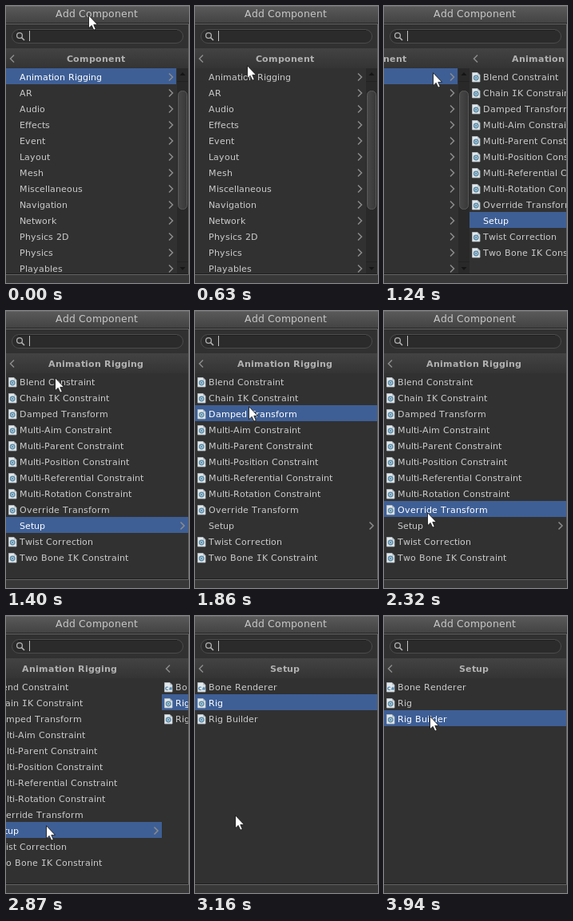
An HTML page for the animation above (4.17 s loop, 229 px wide and 347 px high).

```html
<!DOCTYPE html>
<html lang="en">
<head>
<meta charset="utf-8">
<title>Add Component menu</title>
<style>
html, body { margin: 0; width: 100%; height: 100%; overflow: hidden; background: #313131; }
svg { display: block; width: 229px; height: 347px; }
text { font-family: "DejaVu Sans", Verdana, sans-serif; font-size: 11px; fill: #cbcbcb; white-space: pre; }
.serif { font-family: "DejaVu Sans Mono", monospace; }
.title { font-size: 12.4px; fill: #c8c8c8; }
.head { font-weight: bold; fill: #b2b2b2; }
.on { fill: #fff; }
.chev { fill: none; stroke: #8c8c8c; stroke-width: 1.5; }
</style>
</head>
<body>
<svg id="stage" viewBox="0 0 229 347">
  <defs>
    <linearGradient id="btn" x2="0" y2="1"><stop stop-color="#5a5a5a"/><stop offset="1" stop-color="#434343"/></linearGradient>
    <linearGradient id="bar" x2="0" y2="1"><stop stop-color="#434343"/><stop offset="1" stop-color="#343434"/></linearGradient>
    <linearGradient id="thumb" x2="1" y2="0"><stop stop-color="#484848"/><stop offset="1" stop-color="#383838"/></linearGradient>
    <clipPath id="view"><rect y="53" width="228" height="282"/></clipPath>
    <g id="page">
      <path d="M3.5 83.5h6.5l3 3v8.5h-9.5z" fill="#e3e8ea" stroke="#b9c2c7" stroke-width=".8"/>
      <path d="M10 83.5v3h3" fill="#b4bfc6"/>
    </g>
    <g id="gear">
      <use href="#page"/>
      <circle cx="8.2" cy="90" r="2.7" fill="#bcd3e0" stroke="#5c8aa6" stroke-width="1.4"/>
      <circle cx="8.2" cy="90" r=".9" fill="#3c789c"/>
    </g>
    <g id="script">
      <use href="#page"/>
      <text x="4" y="92.5" style="font-size:6px;font-weight:bold;fill:#3776a8">C#</text>
    </g>
  </defs>
  <rect width="229" height="347" fill="#313131"/>
  <rect y="53" width="229" height="25" fill="url(#bar)"/>
  <g id="panels" clip-path="url(#view)"></g>
  <g id="chrome">
    <rect width="229" height="21" fill="url(#btn)"/>
    <path d="M0 .5H229" stroke="#6a6a6a"/>
    <path d="M0 21.5H229" stroke="#232323"/>
    <rect x="7.5" y="29.5" width="214" height="17" rx="8.5" fill="#2b2b2b" stroke="#4c4c4c"/>
    <path d="M15 30.5H214" stroke="#1e1e1e"/>
    <circle cx="17" cy="37" r="3.4" fill="none" stroke="#b0b0b0" stroke-width="1.3"/>
    <path d="M19.5 39.5l3.5 3.5" stroke="#b0b0b0" stroke-width="1.7"/>
    <path d="M29.5 31V44" stroke="#c4c4c4"/>
    <rect y="335" width="229" height="12" fill="#383838"/>
    <path d="M0 335.5H228" stroke="#1e1e1e"/>
    <path d="M0 22.5H228.5V336.5H0" fill="none" stroke="#656565"/>
  </g>
  <path id="cursor" d="M.5 .7V16.8L4.2 13.4L6.8 19.2L9.3 18.1L6.8 12.4H11.6Z" fill="#fff" stroke="#1a1a1a" stroke-width=".9"/>
</svg>
<script>
const LOOP = 4170, WIDTH = 228, TOP = 78, ROW = 20;
const $ = id => document.getElementById(id);
const pen = document.createElement('canvas').getContext('2d');

function el(name, attrs, parent) {
  const node = document.createElementNS('http://www.w3.org/2000/svg', name);
  for (const key in attrs) node.setAttribute(key, attrs[key]);
  return parent.appendChild(node);
}

// Text set on whole-pixel advances, as hinted UI type is.
function label(parent, str, x, y, { size = 11, bold = false, center = false, cls = '' } = {}) {
  const widths = [...str].map(ch => {
    const face = ch === 'I' ? '"DejaVu Sans Mono", monospace' : '"DejaVu Sans", Verdana, sans-serif';
    pen.font = `${bold ? 'bold ' : ''}100px ${face}`;
    return Math.round(pen.measureText(ch).width * size / 100 + .1);
  });
  if (center) x = Math.round(x - widths.reduce((a, b) => a + b) / 2);
  const xs = widths.map(w => (x += w) - w);
  const text = el('text', { x: xs.join(' '), y, class: cls }, parent);
  for (const part of str.split(/(I)/)) {
    if (part) el('tspan', part === 'I' ? { class: 'serif' } : {}, text).textContent = part;
  }
  return text;
}

const chevron = (parent, x, y, dir) =>
  el('path', { d: `M${x} ${y - 4.5}l${4.5 * dir} 4.5l${-4.5 * dir} 4.5`, class: 'chev' }, parent);

function scrollbar(g) {
  el('rect', { x: 214, y: 78, width: 14, height: 257, fill: '#292929' }, g);
  el('rect', { x: 215.5, y: 106.5, width: 11, height: 148, rx: 5, fill: 'url(#thumb)', stroke: '#5a5a5a' }, g);
  el('path', { d: 'M217.5 87h7l-3.5-4zM217.5 327h7l-3.5 4z', fill: '#151515' }, g);
  el('path', { d: 'M214 94.5h14M214 320.5h14', stroke: '#222' }, g);
}

// A name ending in ">" opens a submenu; "#" marks a script icon.
function panel(title, names, scrolls) {
  const g = el('g', {}, $('panels'));
  const bar = el('rect', { width: scrolls ? 213 : WIDTH, height: ROW, fill: '#3e5f96' }, g);
  chevron(g, 10, 66, -1);
  label(g, title, 112, 70, { bold: true, center: true, cls: 'head' });
  const texts = names.map((name, i) => {
    const y = TOP + i * ROW;
    if (name.endsWith('>')) chevron(g, scrolls ? 204 : 218.5, y + 11, 1);
    else el('use', { href: name.endsWith('#') ? '#script' : '#gear', y: i * ROW }, g);
    return label(g, name.replace(/[>#]$/, ''), 17, y + 15);
  });
  if (scrolls) scrollbar(g);
  return {
    place(x) {
      g.style.display = Math.abs(x) < WIDTH ? '' : 'none';
      g.setAttribute('transform', `translate(${x})`);
    },
    select(n) {
      bar.style.display = n < 0 ? 'none' : '';
      bar.setAttribute('y', TOP + n * ROW);
      texts.forEach((t, i) => t.classList.toggle('on', i === n));
    }
  };
}

const multi = ['Aim', 'Parent', 'Position', 'Referential', 'Rotation'].map(s => `Multi-${s} Constraint`);
const menus = [
  panel('Component', ['Animation Rigging', 'AR', 'Audio', 'Effects', 'Event', 'Layout', 'Mesh',
    'Miscellaneous', 'Navigation', 'Network', 'Physics 2D', 'Physics', 'Playables'].map(s => s + '>'), true),
  panel('Animation Rigging', ['Blend Constraint', 'Chain IK Constraint', 'Damped Transform', ...multi,
    'Override Transform', 'Setup>', 'Twist Correction', 'Two Bone IK Constraint']),
  panel('Setup', ['Bone Renderer#', 'Rig', 'Rig Builder'])
];
label($('chrome'), 'Add Component', 113, 14, { size: 12.4, center: true, cls: 'title' });

// The screen refreshes only at these moments: [first, last, count], on a 10 ms clock.
const ticks = [0];
for (const [a, b, n] of [[310, 780, 7], [860, 860, 1], [1170, 1400, 4], [1700, 2160, 7],
  [2240, 2630, 6], [2870, 3390, 8], [3490, 3940, 7]]) {
  for (let i = 0; i < n; i++) ticks.push(Math.floor((a + (b - a) * i / Math.max(1, n - 1)) / 10) * 10);
}

// Pointer path: time, x, y.
const path = [
  [0, 103, 11], [232, 103, 11], [460, 82, 45], [620, 65, 74], [780, 62, 82], [860, 61, 83],
  [1620, 61, 83], [1700, 62, 87], [1850, 67, 119], [2010, 66, 155], [2160, 61, 188],
  [2240, 57, 222], [2310, 54, 252], [2390, 53, 257], [2470, 52, 260], [2630, 50, 262],
  [3090, 50, 262], [3160, 50, 249], [3240, 51, 236], [3390, 53, 197], [3560, 54, 152],
  [3640, 55, 130], [3710, 56, 112], [3790, 56, 107], [3860, 57, 116], [3940, 57, 125], [LOOP, 57, 125]
];

function pointer(t) {
  const i = path.findIndex(p => p[0] > t);
  const [a, b] = [path[i - 1], path[i]];
  const k = (t - a[0]) / (b[0] - a[0]);
  return [1, 2].map(n => Math.round(a[n] + (b[n] - a[n]) * k));
}

function slide(t, start) {
  const k = Math.min(1, Math.max(0, (t - start) / 250));
  return k * k * (3 - 2 * k);
}

function hover(y, count) {
  const n = Math.floor((y - TOP) / ROW);
  return n >= 0 && n < count ? n : -1;
}

function draw(now) {
  const time = now % LOOP;
  const t = ticks.findLast(v => v <= time);
  const [x, y] = pointer(t);
  const depth = slide(t, 1110) + slide(t, 2810);
  menus.forEach((m, i) => m.place(Math.round((i - depth) * WIDTH)));
  // Each menu keeps its remembered row until the pointer moves.
  menus[0].select(t < 380 ? 0 : hover(y, 13));
  menus[1].select(t < 1700 || t > 2700 ? 9 : hover(y, 12));
  menus[2].select(t < 3200 ? 1 : hover(y, 3));
  $('cursor').setAttribute('transform', `translate(${x} ${y})`);
}

const start = performance.now();
function tick() {
  draw(performance.now() - start);
  requestAnimationFrame(tick);
}
tick();
</script>
</body>
</html>
```
